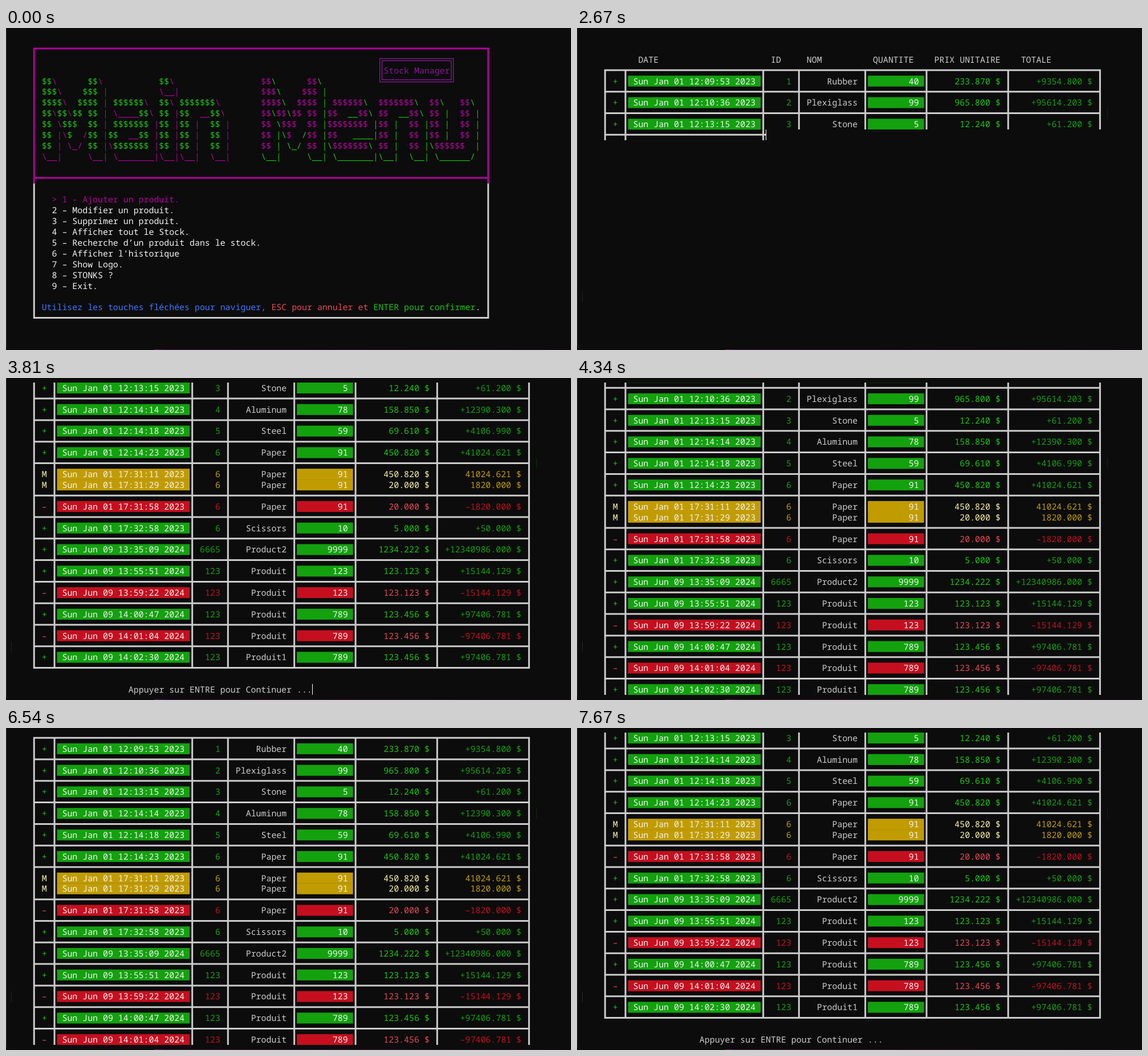
Recreate the animation shown at these times as an HTML page. Size 991 by 565 pixels, loop 8000 ms.

```html
<!DOCTYPE html>
<html lang="fr">
<head>
<meta charset="utf-8">
<title>Stock console</title>
<style>
  html, body { margin: 0; width: 100%; height: 100%; overflow: hidden; background: #0c0c0c; }

  #stage {
    --col: 8.95px;
    --line: 18.9px;
    position: relative; width: 991px; height: 565px; overflow: hidden;
    animation: pick 8s step-end infinite, print 8s step-end infinite,
               scroll 8s step-end infinite, blink 8s step-end infinite;
  }
  .edge { position: absolute; left: 0; top: -9px; width: 20px; height: 572px; border-left: 1px solid #303030; border-bottom-left-radius: 7px; }
  .glow { position: absolute; left: 260px; right: 0; bottom: 0; height: 1px; background: linear-gradient(90deg, #8a1a80, #4a1248 3%, #3a1038 60%, #1c0c1c); }
  .mark { position: absolute; width: 1px; height: 19px; }

  .view { position: absolute; left: 0; top: 8px; width: 991px; height: 548.1px; overflow: hidden; }
  #menu { animation: leave 8s step-end infinite; }
  #log { animation: enter 8s step-end infinite; }
  #roll { transform: translateY(calc(var(--top) * -1 * var(--line))); }
  #sheet {
    --y: calc(var(--n) * var(--line));
    --x: calc(var(--c) * var(--col));
    clip-path: polygon(0 0, 100% 0, 100% var(--y), var(--x) var(--y),
      var(--x) calc(var(--y) + var(--line)), 0 calc(var(--y) + var(--line)));
  }
  #cursor {
    position: absolute; width: 1px; height: 19px; background: #fff; opacity: var(--on);
    left: calc(var(--c) * var(--col)); top: calc(var(--n) * var(--line));
  }

  svg { display: block; }
  text {
    font: 500 14.917px "Noto Sans Mono", "DejaVu Sans Mono", monospace;
    white-space: pre; text-rendering: geometricPrecision; font-variant-ligatures: none;
  }
  .item { --gap: max(var(--pick) - var(--i), var(--i) - var(--pick)); }
  .plain { opacity: var(--gap); }
  .picked { opacity: calc(1 - var(--gap)); }

  @keyframes pick {
    0% { --pick: 0 } 10.875% { --pick: 1 } 14% { --pick: 2 }
    17.375% { --pick: 3 } 19.875% { --pick: 4 } 22.375% { --pick: 5 }
  }
  @keyframes print {
    0% { --n: 3; --c: 0 }
    33.375% { --n: 9; --c: 37 }
    34.25% { --n: 16; --c: 57 }
    35.125% { --n: 23; --c: 10 }
    36% { --n: 30; --c: 16 }
    36.875% { --n: 36; --c: 60 }
  }
  @keyframes scroll {
    0% { --top: 0 } 36% { --top: 2 } 36.875% { --top: 8 }
    54.25% { --top: 5 } 55.5% { --top: 2 } 56.75% { --top: 0 }
    81.75% { --top: 3 } 84.25% { --top: 6 } 87.625% { --top: 8 }
  }
  @keyframes blink {
    0% { --on: 1 } 41% { --on: 0 } 47.625% { --on: 1 }
    54.25% { --on: 0 } 89.25% { --on: 1 } 95.875% { --on: 0 }
  }
  @keyframes leave { 0% { opacity: 1 } 32.5% { opacity: 0 } }
  @keyframes enter { 0% { opacity: 0 } 32.5% { opacity: 1 } }
</style>
</head>
<body>
<div id="stage">
  <div class="edge"></div>
  <div class="glow"></div>
  <div class="view" id="menu"><svg id="menuArt" width="991" height="549"></svg></div>
  <div id="log">
    <div class="mark" style="left:9px;top:462px;background:#232323"></div>
    <div class="mark" style="left:930px;top:140px;background:#0b2c0b"></div>
    <div class="view">
      <div id="roll">
        <div id="sheet"><svg id="logArt" width="991" height="718"></svg></div>
        <div id="cursor"></div>
      </div>
    </div>
  </div>
</div>
<script>
const COL = 8.95, LINE = 18.9;
const WHITE = '#f2f2f2', GREY = '#cccccc', GREEN = '#13a10e', LIME = '#16c60c',
      PINK = '#b4009e', PURPLE = '#881798', BLUE = '#3b78ff', ROSE = '#e74856';
const midX = c => (c + .5) * COL;
const midY = r => r * LINE + 9.2;

function add(parent, tag, attrs, content) {
  const node = document.createElementNS('http://www.w3.org/2000/svg', tag);
  for (const key in attrs) node.setAttribute(key, attrs[key]);
  if (content) node.textContent = content;
  return parent.appendChild(node);
}
const write = (to, c, r, str, fill, extra) =>
  add(to, 'text', { x: c * COL, y: r * LINE + 14.9, fill, ...extra }, str);
const writeEnd = (to, c, r, str, fill) => write(to, c, r, str, fill, { 'text-anchor': 'end' });
const rule = (to, d, stroke, width = 3) =>
  add(to, 'path', { d, stroke, fill: 'none', 'stroke-width': width });
const block = (to, c, r, cols, fill) =>
  add(to, 'rect', { x: c * COL, y: r * LINE, width: cols * COL, height: LINE + .2, fill });

// Menu
const title = String.raw`
$$\      $$\           $$\                 $$\      $$\
$$$\    $$$ |          \__|                $$$\    $$$ |
$$$$\  $$$$ | $$$$$$\  $$\ $$$$$$$\        $$$$\  $$$$ | $$$$$$\  $$$$$$$\  $$\   $$\
$$\$$\$$ $$ | \____$$\ $$ |$$  __$$\       $$\$$\$$ $$ |$$  __$$\ $$  __$$\ $$ |  $$ |
$$ \$$$  $$ | $$$$$$$ |$$ |$$ |  $$ |      $$ \$$$  $$ |$$$$$$$$ |$$ |  $$ |$$ |  $$ |
$$ |\$  /$$ |$$  __$$ |$$ |$$ |  $$ |      $$ |\$  /$$ |$$   ____|$$ |  $$ |$$ |  $$ |
$$ | \_/ $$ |\$$$$$$$ |$$ |$$ |  $$ |      $$ | \_/ $$ |\$$$$$$$\ $$ |  $$ |\$$$$$$  |
\__|     \__| \_______|\__|\__|  \__|      \__|     \__| \_______|\__|  \__| \______/
`.trim().split('\n');
const items = ['Ajouter un produit.', 'Modifier un produit.', 'Supprimer un produit.',
  'Afficher tout le Stock.', 'Recherche d’un produit dans le stock.', "Afficher l'historique",
  'Show Logo.', 'STONKS ?', 'Exit.'];

function drawMenu(to) {
  const left = midX(5), right = midX(94), split = 14 * LINE;
  rule(to, `M${left} ${split}V${midY(26)}H${right}V${split}`, GREY);
  rule(to, `M${left} ${split}V${midY(1)}H${right}V${split}M${left} ${midY(13)}H${right}`, PINK);

  for (const inset of [0, 3.8])
    add(to, 'rect', {
      x: 655.7 + inset, y: 45.6 + inset, width: 129 - 2 * inset, height: 41 - 2 * inset,
      fill: 'none', stroke: PURPLE, 'stroke-width': 1.4
    });
  write(to, 74, 3, 'Stock Manager', PURPLE);

  // The two words swap the colours of dollars and strokes
  title.forEach((row, r) => {
    const layer = lime => [...row].map((ch, i) =>
      ((ch === '$') === (i < 43)) === lime ? ch : ' ').join('');
    write(to, 7, r + 4, layer(true), LIME);
    write(to, 7, r + 4, layer(false), PINK);
  });

  items.forEach((label, i) => {
    const str = `${i + 1} – ${label}`;
    const group = add(to, 'g', { class: 'item', style: `--i:${i}` });
    write(group, 9, 15 + i, str, WHITE, { class: 'plain' });
    write(group, 9, 15 + i, '> ' + str, PINK, { class: 'picked' });
  });

  write(to, 7, 25, 'Utilisez les touches fléchées pour naviguer,', BLUE);
  write(to, 52, 25, 'ESC pour annuler et', ROSE);
  write(to, 72, 25, 'ENTER pour confirmer', LIME);
  write(to, 92, 25, '.', WHITE);
}

// History table
const tones = {
  '+': { dim: GREEN, lit: LIME },
  '–': { dim: '#c50f1f', lit: ROSE },
  'M': { dim: '#c19c00', lit: '#f9f1a5' }
};
const records = `
+|Jan 01 12:09:53 2023|1|Rubber|40|233.870|9354.800
+|Jan 01 12:10:36 2023|2|Plexiglass|99|965.800|95614.203
+|Jan 01 12:13:15 2023|3|Stone|5|12.240|61.200
+|Jan 01 12:14:14 2023|4|Aluminum|78|158.850|12390.300
+|Jan 01 12:14:18 2023|5|Steel|59|69.610|4106.990
+|Jan 01 12:14:23 2023|6|Paper|91|450.820|41024.621
M|Jan 01 17:31:11 2023|6|Paper|91|450.820|41024.621
M|Jan 01 17:31:29 2023|6|Paper|91|20.000|1820.000
–|Jan 01 17:31:58 2023|6|Paper|91|20.000|1820.000
+|Jan 01 17:32:58 2023|6|Scissors|10|5.000|50.000
+|Jun 09 13:35:09 2024|6665|Product2|9999|1234.222|12340986.000
+|Jun 09 13:55:51 2024|123|Produit|123|123.123|15144.129
–|Jun 09 13:59:22 2024|123|Produit|123|123.123|15144.129
+|Jun 09 14:00:47 2024|123|Produit|789|123.456|97406.781
–|Jun 09 14:01:04 2024|123|Produit|789|123.456|97406.781
+|Jun 09 14:02:30 2024|123|Produit1|789|123.456|97406.781
`.trim().split('\n').map(row => row.split('|'));

function drawLog(to) {
  const heads = { DATE: 12, ID: 38, NOM: 45, QUANTITE: 58, 'PRIX UNITAIRE': 70, TOTALE: 87 };
  for (const name in heads) write(to, heads[name], 2, name, GREY);

  const across = r => `M${midX(5) - 1.5} ${midY(r)}H${midX(102) + 1.5}`;
  let grid = across(3), r = 4;
  records.forEach(([sign, date, id, name, count, price, total], i) => {
    const { dim, lit } = tones[sign];
    block(to, 10, r, 26, dim);
    block(to, 57, r, 11, dim);
    write(to, 7, r, sign, lit);
    write(to, 11, r, 'Sun ' + date, WHITE);
    writeEnd(to, 42, r, id, dim);
    writeEnd(to, 55, r, name, GREY);
    writeEnd(to, 67, r, count, WHITE);
    writeEnd(to, 83, r, price + ' $', lit);
    writeEnd(to, 101, r, (sign === 'M' ? '' : sign) + total + ' $', dim);
    r++;
    // A modification keeps its before and after lines together
    const paired = sign === 'M' && records[i + 1][0] === 'M';
    if (!paired) grid += across(r++);
  });
  for (const c of [5, 9, 36, 43, 56, 68, 84, 102])
    grid += `M${midX(c)} ${midY(3)}V${midY(r - 1)}`;
  rule(to, grid, GREY);
  write(to, 24, 36, 'Appuyer sur ENTRE pour Continuer ...', GREY);
}

drawMenu(document.getElementById('menuArt'));
drawLog(document.getElementById('logArt'));
</script>
</body>
</html>
```
